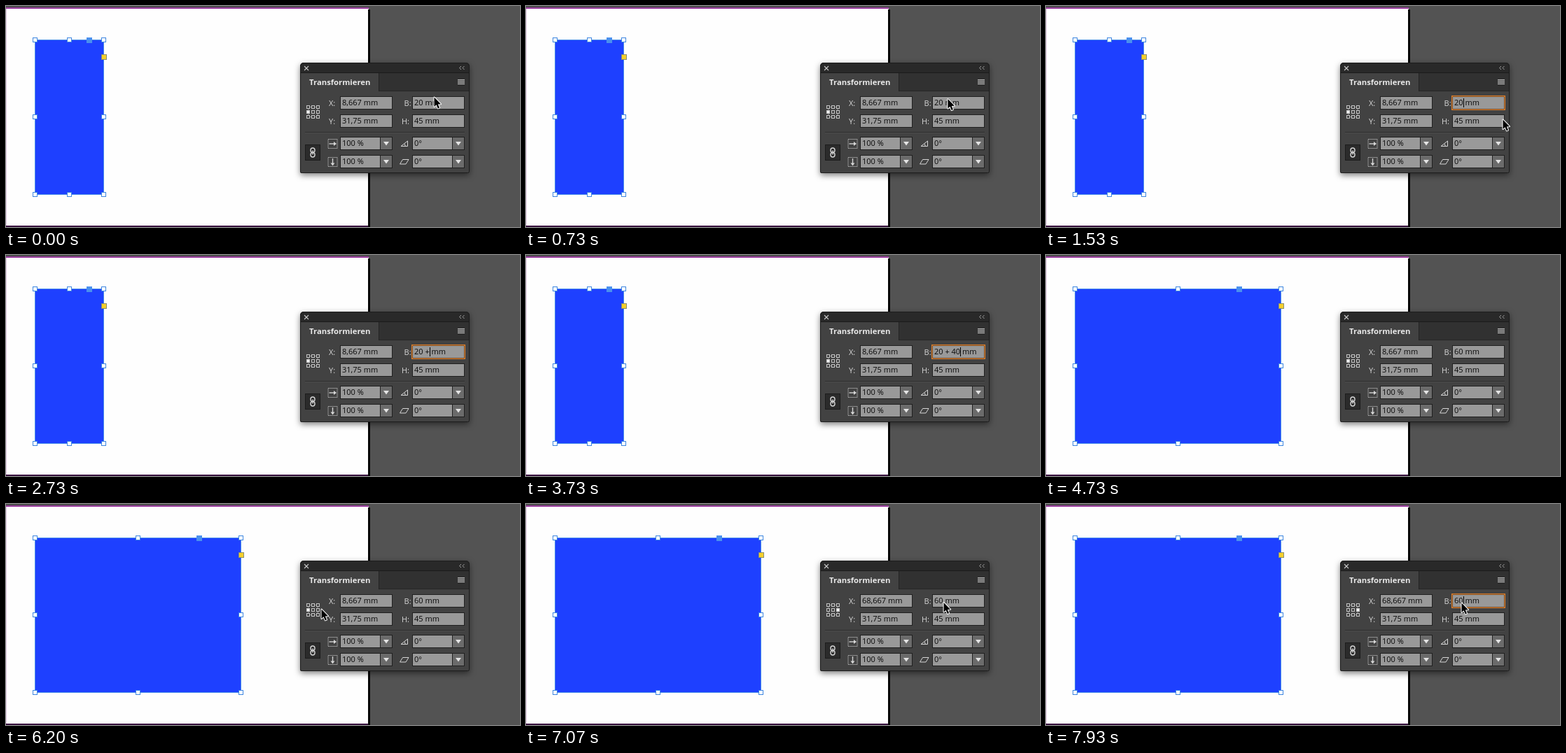
Animation of 734 by 316 pixels, one loop 8000 ms. Source, as an HTML page with a canvas:

```html
<!DOCTYPE html>
<html lang="de">
<head>
<meta charset="utf-8">
<style>
  html, body { margin: 0; width: 734px; height: 316px; overflow: hidden; background: #535353; }
  canvas { display: block; }
</style>
</head>
<body>
<canvas id="stage" width="734" height="316"></canvas>
<script>
const ctx = document.getElementById('stage').getContext('2d');
const LOOP = 8000, RESIZE = 4700, REFERENCE = 6420, REFOCUS = 7860;
const BLINK = 1130;
const LIGHT = '#d6d6d6', BODY = '#424242', EDGE = '#202020';

// [time, text before the caret]
const typing = [[1070, '20'], [1670, '20 '], [2500, '20 +'], [2930, '20 + '], [3300, '20 + 4'], [3650, '20 + 40']];

// [time, x, y] of the pointer tip; hidden while typing
const pointerPaths = [
  [[0, 611, 130], [400, 611, 130], [950, 597, 134], [1120, 597, 134], [1480, 652, 162], [1670, 652, 162]],
  [[5300, 648, 162], [5450, 648, 162], [6060, 450, 150], [6250, 450, 150], [6380, 447, 151],
   [6480, 447, 151], [6920, 600, 140], [7200, 593, 141], [LOOP, 593, 141]]
];

function box(x, y, w, h, fill, stroke, lineWidth = 1) {
  if (fill) { ctx.fillStyle = fill; ctx.fillRect(x, y, w, h); }
  if (stroke) {
    ctx.strokeStyle = stroke;
    ctx.lineWidth = lineWidth;
    ctx.strokeRect(x + lineWidth / 2, y + lineWidth / 2, w - lineWidth, h - lineWidth);
  }
}

function path(points, { fill, stroke, width = 1, close = false }) {
  ctx.beginPath();
  points.forEach(([x, y]) => ctx.lineTo(x, y));
  if (close) ctx.closePath();
  if (fill) { ctx.fillStyle = fill; ctx.fill(); }
  if (stroke) { ctx.strokeStyle = stroke; ctx.lineWidth = width; ctx.stroke(); }
}

function text(str, x, y, color = '#080808', font = '11px') {
  ctx.font = `${font} "Open Sans", "Noto Sans", sans-serif`;
  ctx.fillStyle = color;
  ctx.fillText(str, x, y);
}

function drawPage() {
  box(0, 0, 734, 316, '#535353');
  box(0, 0, 520, 2, '#4b4b4b');
  box(0, 2, 518, 313, '#fefefe');
  box(0, 2, 518, 2, '#9a3c9e');
  box(0, 4, 1, 310, '#e6cfe8');
  box(0, 314, 520, 2, '#3a0d40');
  box(517, 5, 3, 311, '#050505');
}

function drawShape(width) {
  const left = 41, top = 48, height = 221;
  box(left, top, width, height, '#1e40ff');
  box(left, top, width + 1, height + 1, null, '#4a8ee8');
  for (const fx of [0, 0.5, 1])
    for (const fy of [0, 0.5, 1])
      if (fx !== 0.5 || fy !== 0.5)
        box(Math.round(left + fx * width) - 3, Math.floor(top + fy * height) - 3, 7, 7, '#fff', '#3d86e0');
  box(Math.round(left + width * 0.8) - 4, top - 3, 8, 8, '#4a90ee');
  box(left + width - 3, 69, 8, 8, '#f5d02c', '#8a8f70');
}

function drawFrame() {
  ctx.save();
  ctx.shadowColor = 'rgba(0,0,0,.5)';
  ctx.shadowBlur = 9;
  ctx.shadowOffsetY = 3;
  ctx.fillStyle = BODY;
  ctx.beginPath();
  ctx.roundRect(420, 81, 242, 158, [5, 5, 2, 2]);
  ctx.fill();
  ctx.restore();

  ctx.save();
  ctx.clip();
  box(420, 81, 242, 15, '#292929');
  box(420, 95, 242, 1, '#1b1b1b');
  box(420, 96, 242, 26, '#313131');
  box(421, 96, 111, 26, BODY);
  box(532, 96, 1, 26, '#222');
  box(533, 121, 129, 1, '#262626');
  ctx.restore();
  ctx.strokeStyle = '#1c1c1c';
  ctx.lineWidth = 1;
  ctx.beginPath();
  ctx.roundRect(420.5, 81.5, 241, 157, [5, 5, 2, 2]);
  ctx.stroke();

  const thin = { stroke: '#c8c8c8', width: 1.1 };
  path([[426, 86], [432, 92]], thin);
  path([[432, 86], [426, 92]], thin);
  for (const x of [650, 654.5]) path([[x, 86], [x - 2.5, 88.5], [x, 91]], { stroke: '#a0a0a0' });
  for (let y = 105; y < 113; y += 2) box(645, y, 10, 1, '#c4c4c4');
  text('Transformieren', 433, 113, '#e8e8e8', 'bold 11.3px');
  box(427, 180, 228, 1, '#2d2d2d');
  box(427, 181, 228, 1, '#4c4c4c');
}

function drawReferenceGrid(selectedColumn) {
  path([[432, 144.5], [445, 144.5], [445, 158.5], [432, 158.5]], { stroke: '#8c8c8c', close: true });
  for (let col = 0; col < 3; col++)
    for (let row = 0; row < 3; row++) {
      const selected = row === 1 && col === selectedColumn;
      box(429 + col * 7, 142 + row * 7, 5, 5, selected ? '#eee' : BODY, '#c4c4c4');
    }
}

function drawField(x, y, value, focused = false) {
  box(x, y, 75, 19, '#999', EDGE);
  if (focused) box(x - 1, y - 1, 77, 21, null, '#dc7f2c', 1.5);
  text(value, x + 3, y + 13);
}

function drawDropdown(x, y, value) {
  drawField(x, y, value);
  box(x + 57, y, 18, 19, '#6b6b6b', EDGE);
  path([[x + 62, y + 7], [x + 70, y + 7], [x + 66, y + 12.5]], { fill: '#e4e4e4' });
}

function drawScaleIcon(y, vertical) {
  ctx.save();
  ctx.translate(466.5, y);
  ctx.setLineDash([1, 1]);
  box(-7, -7, 14, 14, null, LIGHT);
  ctx.setLineDash([]);
  if (vertical) ctx.rotate(Math.PI / 2);
  path([[-5, 0], [3, 0]], { stroke: LIGHT, width: 1.4 });
  path([[1.5, -3], [5.5, 0], [1.5, 3]], { fill: LIGHT });
  ctx.restore();
}

function drawIcons() {
  box(427, 198, 22, 23, '#2b2b2b', '#1c1c1c');
  ctx.strokeStyle = LIGHT;
  ctx.lineWidth = 1.4;
  ctx.beginPath();
  ctx.roundRect(435, 203, 6, 6.5, 3);
  ctx.roundRect(435, 209.5, 6, 6.5, 3);
  ctx.stroke();
  path([[438, 206.5], [438, 212.5]], { stroke: LIGHT, width: 1.4 });
  drawScaleIcon(197, false);
  drawScaleIcon(223, true);
  path([[564, 200.5], [573.5, 193], [573.5, 200.5]], { stroke: LIGHT, close: true });
  path([[569, 197], [570.5, 200.5]], { stroke: LIGHT });
  path([[562.5, 226], [566.5, 219.5], [575, 219.5], [571, 226]], { stroke: LIGHT, close: true });
}

function widthEntry(t) {
  if (t >= REFOCUS) return { entry: '60', since: REFOCUS };
  if (t >= RESIZE) return { entry: '60' };
  const step = typing.findLast(([start]) => t >= start);
  return step ? { entry: step[1], since: step[0] } : { entry: '20' };
}

function drawPanel(t) {
  const moved = t >= REFERENCE;
  drawFrame();
  drawReferenceGrid(moved ? 2 : 0);
  text('X:', 461, 143, LIGHT);
  text('Y:', 461, 169, LIGHT);
  text('B:', 568.5, 143, LIGHT);
  text('H:', 565, 169, LIGHT);
  drawField(477, 129, moved ? '68,667 mm' : '8,667 mm');
  drawField(477, 155, '31,75 mm');
  drawField(580, 155, '45 mm');

  const { entry, since } = widthEntry(t);
  const focused = since !== undefined;
  drawField(580, 129, entry + ' mm', focused);
  if (focused && (t - since) % BLINK < BLINK / 2)
    box(Math.round(583 + ctx.measureText(entry).width), 132, 1, 13, '#000');

  for (const y of [187, 213]) {
    drawDropdown(477, y, '100 %');
    drawDropdown(580, y, '0°');
  }
  drawIcons();
}

function drawPointer(t) {
  const keys = pointerPaths.find(p => t >= p[0][0] && t < p.at(-1)[0]);
  if (!keys) return;
  const i = keys.findIndex(([time]) => time > t);
  const [t0, x0, y0] = keys[i - 1], [t1, x1, y1] = keys[i];
  const u = (t - t0) / (t1 - t0), ease = u * u * (3 - 2 * u);
  ctx.save();
  ctx.translate(x0 + (x1 - x0) * ease, y0 + (y1 - y0) * ease);
  ctx.lineJoin = 'round';
  const arrow = [[0.5, 0.5], [0.5, 14], [3.6, 11.2], [5.8, 16.4], [8, 15.5], [5.8, 10.4], [10, 10.2]];
  path(arrow, { stroke: '#fff', width: 2, close: true });
  path(arrow, { fill: '#000', close: true });
  ctx.restore();
}

function render(now) {
  const t = now % LOOP;
  drawPage();
  drawShape(t < RESIZE ? 98 : 294);
  drawPanel(t);
  drawPointer(t);
  requestAnimationFrame(render);
}
requestAnimationFrame(render);
</script>
</body>
</html>
```
